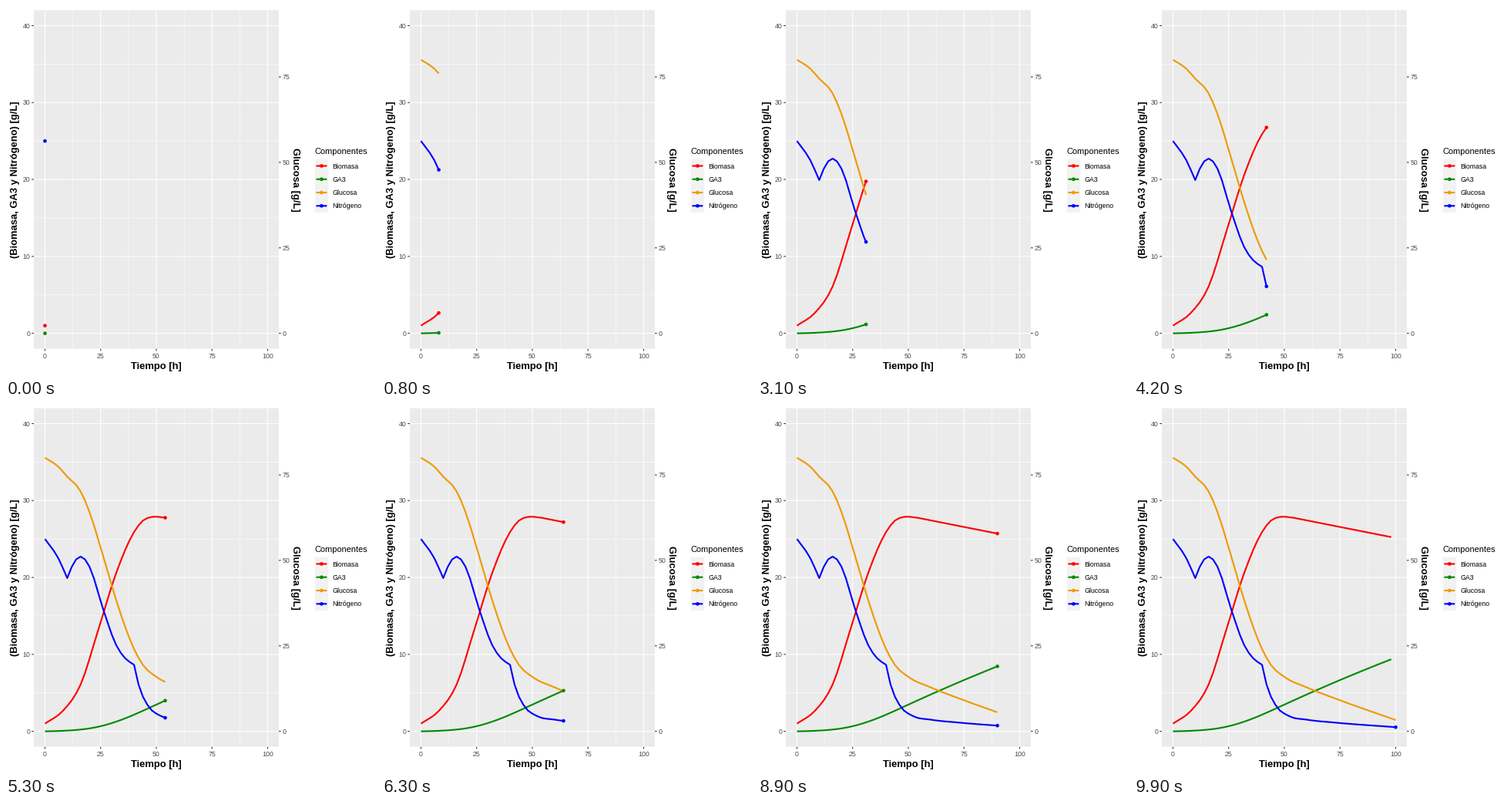
A matplotlib script for the animation above (10000 ms loop, 480 by 480 pixels).

```python
import matplotlib.pyplot as plt
import numpy as np
from matplotlib.animation import FuncAnimation
from matplotlib.patches import Circle, Rectangle

plt.rcParams.update({
    "font.family": "Liberation Sans",
    "text.hinting": "force_autohint",
    "text.hinting_factor": 8,
    "path.simplify": False,
})

SIZE, DPI = 480, 72  # at 72 dpi one point is one pixel
FRAMES, INTERVAL = 100, 100
LEFT, RIGHT, TOP, BOTTOM = 36.1, 353.9, 5.5, 444.6
GLUCOSE_SCALE = 2.25
LINE, RADIUS, GRID = 2.13, 2.32, 1.07
HOURS = np.arange(0, 101, 2)

fig = plt.figure(figsize=(SIZE / DPI, SIZE / DPI), dpi=DPI, facecolor="white")
ax = fig.add_axes([0, 0, 1, 1])
ax.set_xlim(0, SIZE)
ax.set_ylim(SIZE, 0)
ax.axis("off")


def px(hour):
    return LEFT + (np.asarray(hour) + 5) * (RIGHT - LEFT) / 110


def py(value):
    return BOTTOM - (np.asarray(value) + 2) * (BOTTOM - TOP) / 44


def stroke(x, y, color, width, z=1):
    return ax.plot(x, y, color=color, lw=width, zorder=z, snap=False,
                   solid_capstyle="butt", solid_joinstyle="round")[0]


def dot(x, y, color, z):
    return ax.add_patch(Circle((x, y), RADIUS, fc=color, ec="none", lw=0,
                               zorder=z, snap=False))


def box(x, y, w, h, color):
    ax.add_patch(Rectangle((x, y), w, h, fc=color, ec="none", lw=0,
                           zorder=0, snap=False))


def label(x, y, text, size=8.8, color="black", ha="left", **kw):
    ax.text(x, y, text, fontsize=size, color=color, ha=ha, va="baseline",
            rotation_mode="anchor", **kw)


def hermite(t, x, y):
    """Smooth curve through the points (x, y)."""
    m = np.gradient(y, x)
    i = np.clip(np.searchsorted(x, t, side="right") - 1, 0, len(x) - 2)
    h = x[i + 1] - x[i]
    s = (t - x[i]) / h
    return ((1 + 2 * s) * (1 - s) ** 2 * y[i] + s * (1 - s) ** 2 * h * m[i]
            + s * s * (3 - 2 * s) * y[i + 1] + s * s * (s - 1) * h * m[i + 1])


def curve(knots, corners=()):
    """Two-hourly values, smooth between the corners."""
    x, y = np.array(knots, float).T
    hours = HOURS[HOURS <= x[-1]]
    values = np.zeros(len(hours))
    edges = [x[0], *corners, x[-1]]
    for a, b in zip(edges, edges[1:]):
        part, near = (hours >= a) & (hours <= b), (x >= a) & (x <= b)
        values[part] = hermite(hours[part], x[near], y[near])
    return values


def product(cells, rate=0.0049, decay=0.0012):
    """Gibberellin made in proportion to the biomass, with a slow loss."""
    out = [0.0]
    for a, b in zip(cells, cells[1:]):
        out.append(out[-1] + rate * (a + b) - 2 * decay * out[-1])
    return np.array(out)


biomass = curve([(0, 1), (8, 2.65), (16, 6.08), (24, 13.25), (32, 20.6),
                 (40, 25.9), (44, 27.4), (48, 27.87), (54, 27.77),
                 (98, 25.25)], corners=[54])
glucose = curve([(0, 35.56), (6, 34.4), (10, 33.1), (16, 31.2), (20, 28.5),
                 (26, 22.9), (32, 17.05), (40, 10.7), (44, 8.63), (50, 7.08),
                 (60, 5.72), (76, 3.93), (100, 1.47)], corners=[10])
nitrogen = curve([(0, 25), (6, 22.5), (10, 19.92), (13, 21.95), (16, 22.72),
                  (20, 21.4), (26, 16), (32, 11.2), (36, 9.5), (40, 8.65),
                  (42, 6.1), (46, 3.45), (52, 2), (60, 1.52), (73, 1.13),
                  (100, 0.54)], corners=[10, 40])

# name, colour, values, whether a dot leads the line
SERIES = [
    ("Biomasa", "#ff0000", biomass, True),
    ("GA3", "#008b00", product(biomass), True),
    ("Glucosa", "#ee9a00", glucose, False),
    ("Nitrógeno", "#0000ff", nitrogen, True),
]


def draw_panel():
    box(LEFT, TOP, RIGHT - LEFT, BOTTOM - TOP, "#ebebeb")
    for k in range(9):
        minor = k % 2
        width, z = (GRID / 2, 1) if minor else (GRID, 2)
        x, y = px(12.5 * k), py(5 * k)
        stroke([x, x], [TOP, BOTTOM], "white", width, z)
        stroke([LEFT, RIGHT], [y, y], "white", width, z)


def draw_axes():
    tick, grey, drop = "#333333", "#4d4d4d", 3.2
    for v in range(0, 41, 10):
        y = py(v)
        stroke([LEFT - 2.75, LEFT], [y, y], tick, GRID)
        label(LEFT - 4.95, y + drop, str(v), color=grey, ha="right")
    for v in range(0, 76, 25):
        y = py(v / GLUCOSE_SCALE)
        stroke([RIGHT, RIGHT + 2.75], [y, y], tick, GRID)
        label(RIGHT + 4.95, y + drop, str(v), color=grey)
    for v in range(0, 101, 25):
        x = px(v)
        stroke([x, x], [BOTTOM, BOTTOM + 2.75], tick, GRID)
        label(x, 456.6, str(v), color=grey, ha="center")

    title = dict(size=13, ha="center", weight="bold")
    middle = (TOP + BOTTOM) / 2
    label((LEFT + RIGHT) / 2, 471.4, "Tiempo [h]", **title)
    label(15.2, middle, "(Biomasa, GA3 y Nitrógeno) [g/L]", rotation=90,
          **title)
    label(372, middle, "Glucosa [g/L]", rotation=-90, **title)


def draw_legend(x=400.7, y=198.8, key=17.28):
    label(x, 192, "Componentes", size=11)
    box(x, y, key, key * len(SERIES), "#f2f2f2")
    for k, (name, color, *_) in enumerate(SERIES):
        cy = y + key * (k + 0.5)
        stroke([x + 0.1 * key, x + 0.9 * key], [cy, cy], color, LINE, 3)
        dot(x + key / 2, cy, color, 4)
        label(x + key + 5.5, cy + 3.2, name)


draw_panel()
draw_axes()
draw_legend()

lines = [stroke([], [], s[1], LINE, 5 + k) for k, s in enumerate(SERIES)]
dots = [dot(0, 0, s[1], 10 + k) for k, s in enumerate(SERIES)]

# each two-hour sample falls on a whole frame
KEYS = np.rint(HOURS * (FRAMES - 1) / 100)


def update(i):
    now = np.interp(i, KEYS, HOURS)
    for line, head, (_, _, values, leads) in zip(lines, dots, SERIES):
        hours = HOURS[:len(values)]
        end = min(now, hours[-1])
        tip = np.interp(end, hours, values)
        past = hours < end
        line.set_data(px(np.append(hours[past], end)),
                      py(np.append(values[past], tip)))
        head.center = px(end), py(tip)
        head.set_visible(leads and now <= hours[-1])
    return lines + dots


anim = FuncAnimation(fig, update, frames=FRAMES, interval=INTERVAL,
                     repeat=True, repeat_delay=0, blit=False)
plt.show()
```
